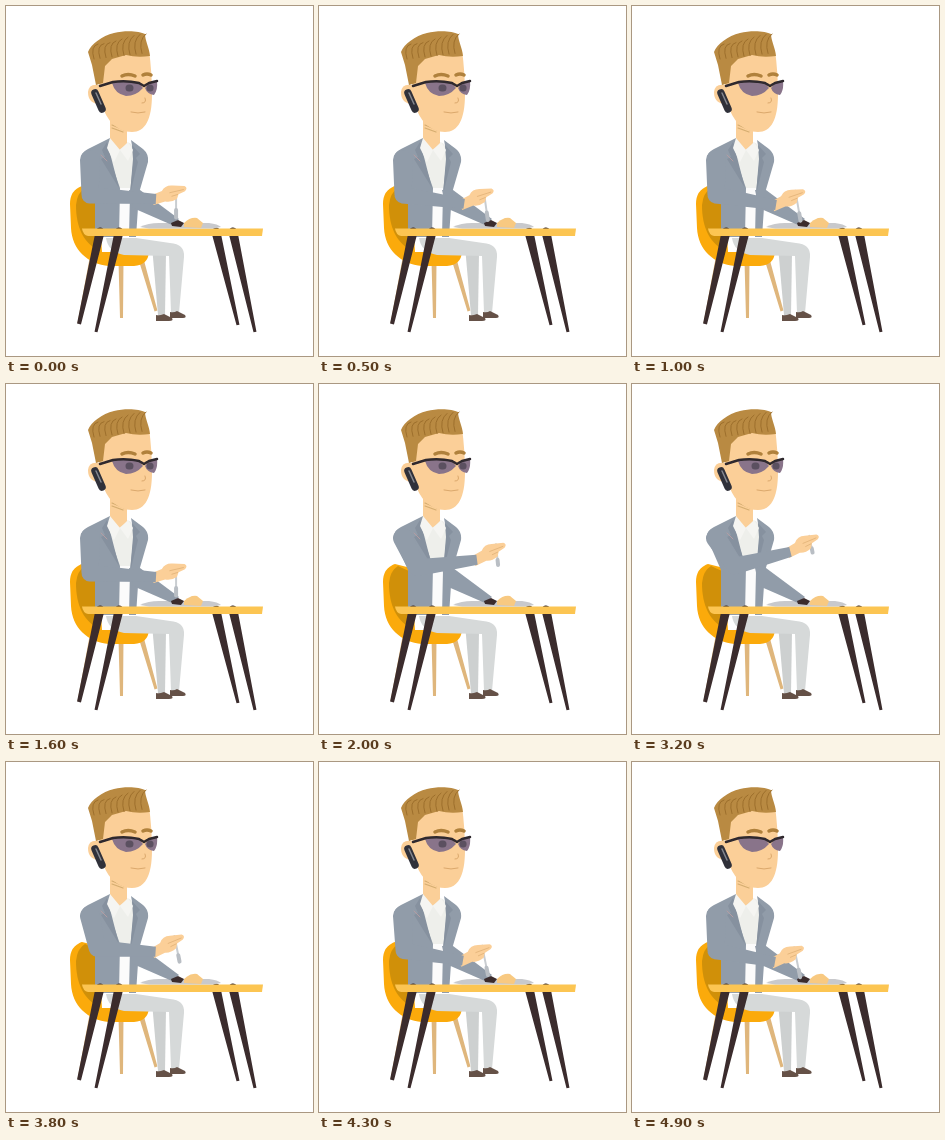
Animation of 307x350 px, one loop 5000 ms. Source, as an HTML page:

```html
<!DOCTYPE html>
<html lang="en">
<head>
<meta charset="utf-8">
<title>Lunch</title>
<style>
html, body { margin: 0; width: 100%; height: 100%; overflow: hidden; background: #fff }
svg { display: block; width: 100%; height: 100% }
.jacket { fill: #919ca9 }
.lapel { fill: #86919f }
.skin { fill: #fbcf98 }
.dark { fill: #3b2c2d }
.line { fill: none; stroke-linecap: round; stroke-linejoin: round }
</style>
</head>
<body>
<svg viewBox="0 0 307 350">
  <!-- chair -->
  <path id="chairLegs" fill="#dfb67c"/>
  <path fill="#fbaa0b" d="M64 198Q64 184 76 180L92 184 96 246H143Q142 259 128 260H103C82 258 66 244 65 222Z"/>
  <path fill="#d09009" d="M70 199Q71 187 79 182L92 188V244C78 237 70 222 70 199Z"/>

  <!-- legs -->
  <path fill="#cdd0d0" d="M146 240L160 247 159 309H152Z"/>
  <path fill="#d6d9d9" d="M100 232H130L164 237Q179 238 178 251L173 307H165L163 250 118 249Q102 246 100 232Z"/>
  <path fill="#655147" d="M150 309q3 1 8-1l8 4q2 3-3 3H150zM164 306q4 1 7-1l8 4q2 3-2 3H164z"/>

  <!-- torso -->
  <path fill="#eeefeb" d="M104 133L124 137 134 150 128 230H95L98 150Z"/>
  <path fill="#fbfbfb" d="M112 182H124V230H112Z"/>
  <path class="jacket" d="M106 131L82 143Q74 147 75 154L89 186V231H113L114 182 101 145Z"/>
  <path class="jacket" d="M125 134L137 143Q143 148 142 156L133 187 130 231H123L124 187 128 150Z"/>
  <path class="lapel" d="M101 136L96 144 99 151 95 153 113 182 105 151Z"/>
  <path class="lapel" d="M126 139L134 148 130 152 132 156 124 188 127 153Z"/>
  <path class="line" stroke="#b39ca2" d="M95 149L101 155"/>

  <!-- head -->
  <path class="skin" d="M104 110H121V138L113 144 104 134Z"/>
  <path class="line" stroke="#d5ad70" stroke-width="1.2" d="M106 119l12 5M106 122l11 4"/>
  <path fill="#f5f5f2" d="M104 132L114 144 108 156 101 142ZM122 136L114 144 122 155 127 144Z"/>
  <path class="skin" d="M96 44H143Q146 67 146 88C146 114 139 126 126 126 111 126 100 114 96 98Q82 99 82 86 83 77 93 79Z"/>
  <path fill="#b98a42" d="M82 46C85 38 96 30 108 27 119 24 134 25 139 28 139 34 143 41 144 50Q131 52 120 49L106 53 99 60 97 77 90 79 86 59Z"/>
  <path id="strands" class="line" stroke="#9d6f2c"/>
  <path class="line" stroke="#b0813c" stroke-width="3.5" d="M116 70Q122 67 129 70M137 69Q141 67 145 69"/>
  <path class="line" stroke="#dba86c" d="M139 92Q141 97 136 97M125 106Q132 108 139 106"/>
  <path fill="#89748a" d="M106 77Q120 74 133 77L137 82Q130 90 120 90 109 88 106 77ZM139 82L143 77 151 75Q152 84 148 89 141 88 139 82Z"/>
  <path id="eyes" class="line" stroke="#5b5060" stroke-width="7" d="M123 82h1M144 82h.1"/>
  <path class="line" stroke="#2f292e" stroke-width="2.5" d="M94 80L107 76Q120 74 133 77L138 80 143 77 151 75"/>
  <path class="line" stroke="#30313a" stroke-width="7.5" d="M89 87L96 103"/>
  <path class="line" stroke="#858890" stroke-width="1.5" d="M90 87L95 98"/>

  <!-- table -->
  <path id="tableLegs" class="dark"/>
  <path fill="#fcc552" d="M76 222.5H257L256 230H82Q77 229 76 222.5Z"/>
  <path fill="#c8c9cc" d="M134 221Q142 217 153 217H203Q212 218 215 221L207 222.5H143Z"/>

  <!-- resting arm -->
  <path class="jacket" d="M123 184H134L173 213 166 219 127 202Z"/>
  <path class="dark" d="M165 217L172 214 178 217 175 221 166 220Z"/>
  <path fill="#f8c981" d="M178 217Q184 211 191 212L197 217 195 222 178 221Z"/>

  <!-- eating arm -->
  <path id="handle" class="line" stroke="#c9cdd1" stroke-width="2"/>
  <path id="prongs" class="line" stroke="#b9bec4" stroke-width="4"/>
  <g id="hand">
    <path class="skin" d="M-4-5L8-6Q13-11 20-8L31-4Q34-1 30 1L23 2 20 6Q13 8 8 5L-4 5Z"/>
    <path class="line" stroke="#e3b47a" stroke-width=".8" d="M15-2L29-1M16 2L22 2"/>
  </g>
  <path id="sleeve" class="jacket"/>
</svg>
<script>
const LOOP = 5000, STEP = 100;
const $ = id => document.getElementById(id);
const set = (id, d) => $(id).setAttribute("d", d);
const mix = (a, b, k) => a + (b - a) * k;
const clamp = x => Math.min(1, Math.max(0, x));
const wave = x => (1 - Math.cos(Math.PI * x)) / 2;

// Tapered limb, rounded at its first end.
function limb([ax, ay], [bx, by], ra, rb) {
  const angle = Math.atan2(by - ay, bx - ax);
  const nx = -Math.sin(angle), ny = Math.cos(angle);
  return `M${ax - nx * ra} ${ay - ny * ra}L${bx - nx * rb} ${by - ny * rb}` +
    `L${bx + nx * rb} ${by + ny * rb}L${ax + nx * ra} ${ay + ny * ra}` +
    `A${ra} ${ra} 0 0 1 ${ax - nx * ra} ${ay - ny * ra}Z`;
}

// The hand slides over the plate, swings up to the mouth and settles back.
function draw(t) {
  const rise = wave(clamp((t - 1700) / 800));
  const fall = (1 - clamp((t - 2500) / 2100)) ** 2;
  const lift = t < 2500 ? rise : fall;
  const slide = t < 2500 ? 1 - wave(t / 800) : 0;
  const swing = Math.sin(Math.PI * lift);

  const bend = lift * (2 - lift);
  const elbow = [mix(84, 111, bend), mix(189, 179, bend)];
  const wx = mix(mix(143, 150, slide), 149, lift) + 13 * swing;
  const wy = mix(mix(200, 193, slide), 121, lift) + 3 * swing;
  set("sleeve", limb([84, 154], elbow, 10, 8.5) + limb(elbow, [wx, wy], 8.5, 5));

  const angle = mix(mix(-24, -17, slide), -1, lift) - 13 * swing;
  $("hand").setAttribute("transform", `translate(${wx} ${wy}) rotate(${angle})`);

  const turn = angle * Math.PI / 180;
  const hx = wx + 21 * Math.cos(turn), hy = wy - 3 + 29 * Math.sin(turn);
  const dx = 6 * (1 - slide) * (1 - lift), dy = 30 * (1 - lift);
  const fork = k => `${hx + dx * k} ${hy + dy * k}`;
  set("handle", `M${fork(0)}L${fork(.75)}`);
  set("prongs", `M${fork(.75)}L${fork(1)}`);

  const blink = Math.abs(t % 3900 - 1000) <= 100;
  $("eyes").style.display = blink ? "none" : "";
}

// Furniture legs lean outwards and taper towards the floor.
const leg = (x, y, foot, floor, top, tip) => limb([x, y], [foot, floor], top / 2, tip / 2);
set("tableLegs", leg(94, 226, 73, 318, 9, 4) + leg(113, 226, 90, 326, 9, 3) +
  leg(210, 226, 232, 319, 9, 3) + leg(227, 226, 249, 326, 9, 3));
set("chairLegs", leg(87, 250, 73, 317, 6, 3) + leg(115, 255, 115.5, 312, 5, 3) +
  leg(135, 253, 150, 305, 5, 3));

let strands = "";
for (let i = 0; i < 9; i++) {
  const x = 88 + i * 6, y = 53 - i * .7;
  strands += `M${x} ${y}Q${x - 4} ${y - 13} ${x + 4} ${mix(38, 28, wave(i / 8))}`;
}
set("strands", strands);

const start = performance.now();
function tick() {
  const t = (performance.now() - start) % LOOP;
  draw(Math.floor(t / STEP) * STEP);
  requestAnimationFrame(tick);
}
tick();
</script>
</body>
</html>
```
